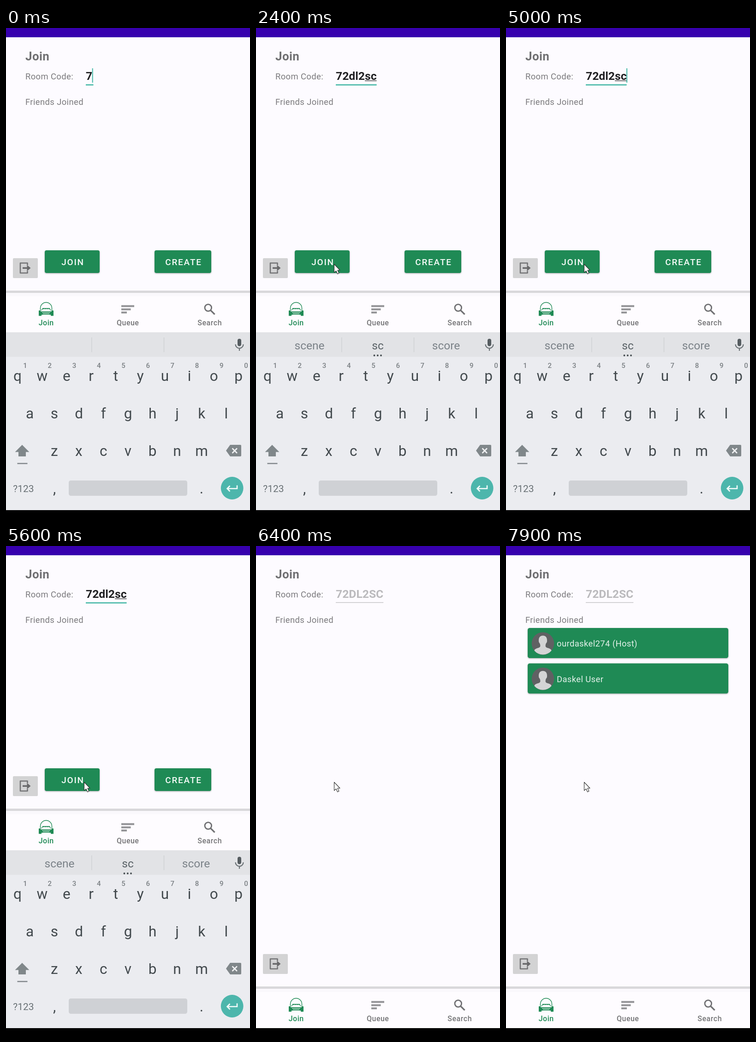
Animation, 529 px wide and 1058 px high, one loop 8000 ms. Source, as an HTML page:

```html
<!DOCTYPE html>
<html lang="en">
<head>
<meta charset="utf-8">
<title>Join a room</title>
<style>
  html, body { margin: 0; width: 100%; height: 100%; overflow: hidden; background: #fdfbff; }
  svg { display: block; width: 100vw; height: 100vh; font-family: Roboto, sans-serif; }
  .body { font-size: 18.4px; letter-spacing: .4px; fill: #7b7a7d; }
  .title { font-size: 26px; font-weight: 700; letter-spacing: .4px; fill: #707072; }
  .code { font-size: 24.7px; font-weight: 700; }
  .button { font-size: 19px; font-weight: 500; letter-spacing: 1.8px; fill: #f4fbf7; }
  .nav { font-size: 16px; font-weight: 500; letter-spacing: .5px; fill: #747476; }
  .word { font-size: 24.5px; fill: #7b8288; }
  .key { font-size: 31.5px; fill: #42494d; }
  .hint { font-size: 15px; font-weight: 500; fill: #7b8084; }
  .mid { text-anchor: middle; }
  .raised { filter: drop-shadow(0 1.5px 1.5px rgba(0, 0, 0, .32)); }
</style>
</head>
<body>
<svg viewBox="0 0 529 1058" preserveAspectRatio="none">
  <defs>
    <g id="avatar">
      <circle r="24.3" fill="#606163"/>
      <path fill="#d4d4d5" d="M0-17C-7-17-9.500-12-9-5C-8.700-1-7-2-6 2C-5 7-6 8-10 9.500C-15 11-18 12-18.500 15.500A24.300 24.300 0 0 0 18.500 15.500C18 12 15 11 10 9.500C6 8 5 7 6 2C7-2 8.700-1 9-5C9.500-12 7-17 0-17Z"/>
    </g>
  </defs>

  <rect width="529" height="1058" fill="#fdfbff"/>
  <rect width="529" height="20" fill="#3700ae"/>
  <text class="title" x="42" y="70">Join</text>
  <text class="body" x="42" y="111">Room Code:</text>
  <text class="body" x="42" y="166">Friends Joined</text>

  <text class="code" id="code" x="173" y="112"></text>
  <rect id="line" x="173"/>
  <rect id="composing" y="113.300" height="1.300" fill="#333"/>
  <rect id="caret" y="87" width="2" height="31" fill="#45b8a7"/>

  <g id="cards">
    <g class="raised" fill="#1f8a55">
      <rect x="47" y="177" width="435" height="65" rx="4.500"/>
      <rect x="47" y="253.500" width="435" height="65" rx="4.500"/>
    </g>
    <text class="body" x="110" y="217" style="fill:#e3f1ea">ourdaskel274 (Host)</text>
    <text class="body" x="110" y="293.500" style="fill:#e3f1ea">Daskel User</text>
    <g id="avatars">
      <use href="#avatar" x="80" y="210.500"/>
      <use href="#avatar" x="80" y="286.800"/>
    </g>
  </g>

  <g id="footer">
    <g id="buttons">
      <g class="raised" fill="#1f8a55">
        <rect x="84" y="480" width="119" height="49" rx="4"/>
        <rect x="322" y="480" width="123" height="49" rx="4"/>
      </g>
      <text class="button mid" x="145" y="512">JOIN</text>
      <text class="button mid" x="385" y="512">CREATE</text>
    </g>

    <rect x="15" y="497" width="54" height="43" rx="2" fill="#d3d3d4"/>
    <path d="M46.500 512V507.500H31V529H46.500V524.500" fill="none" stroke="#747476" stroke-width="2.600" stroke-linejoin="round"/>
    <path d="M36 516.500H45.500V511.500L53.500 518.200L45.500 525V520H36Z" fill="#69696b"/>

    <rect y="567" width="529" height="5" fill="#d9d8db"/>
    <rect y="572" width="529" height="7" fill="#faf8fc"/>
    <rect y="579" width="529" height="79" fill="#fefcff"/>

    <g stroke="#1f8a55" fill="none">
      <path d="M74.500 612V605A12.500 12.500 0 0 1 99.500 605V612" stroke-width="1.400"/>
      <path d="M77 610L79.500 605.500H94.500L97 610" stroke-width="1.300"/>
      <path d="M80 606H94" stroke-width="1.800" stroke-dasharray="3 1"/>
    </g>
    <path fill="#1f8a55" d="M71 610H75V612H99V610H103V621.500H97V619H77V621.500H71Z"/>
    <path d="M78 614.500H96M80 617H94" stroke="#e7f4ed" stroke-width="1"/>

    <g fill="#929295">
      <rect x="250" y="598.500" width="28" height="4"/>
      <rect x="250" y="605.500" width="20.500" height="4"/>
      <rect x="250" y="612.300" width="12" height="4"/>
    </g>
    <g fill="none" stroke="#707073" stroke-width="2.800">
      <circle cx="438.300" cy="604" r="7.300"/>
      <path d="M443.500 609.300L452.500 618.300" stroke-width="3.300"/>
    </g>
    <text class="nav mid" x="87.200" y="642" style="fill:#1f8a55">Join</text>
    <text class="nav mid" x="264.200" y="642">Queue</text>
    <text class="nav mid" x="441.700" y="642">Search</text>
  </g>

  <g id="keyboard">
    <rect y="657" width="529" height="385" fill="#ebecf0"/>
    <rect y="657" width="529" height="53" fill="#e2e3e6"/>
    <path d="M185.800 668V700M342.500 668V700" stroke="#cccfd2" stroke-width="1.300"/>
    <text class="word mid" id="left" x="116" y="694"></text>
    <text class="word mid" id="centre" x="264" y="694" style="fill:#596166"></text>
    <text class="word mid" id="right" x="412" y="694"></text>
    <g id="dots" fill="#454c50">
      <circle cx="256.500" cy="707" r="1.900"/>
      <circle cx="263.800" cy="707" r="1.900"/>
      <circle cx="271" cy="707" r="1.900"/>
    </g>

    <rect x="502" y="671" width="8" height="16" rx="4" fill="#555c60"/>
    <path d="M497.500 683A8.500 8.500 0 0 0 514.500 683M506 691.500V697" fill="none" stroke="#697074" stroke-width="2.200"/>

    <g id="keys"></g>
    <path d="M35 900L50.500 915.500H43V925H27V915.500H19.500Z" fill="#80878a"/>
    <rect x="24.500" y="939" width="22" height="2.600" fill="#868c90"/>
    <path d="M486 900H508Q510 900 510 902V923Q510 925 508 925H486L477 912.500Z" fill="#80878a"/>
    <path d="M490.500 907.500L501 918M501 907.500L490.500 918" stroke="#f1f2f4" stroke-width="2.600"/>
    <text class="mid" x="38" y="1002" font-size="21" fill="#697175">?123</text>
    <text class="key mid" x="105" y="1005">,</text>
    <text class="key mid" x="424" y="1005">.</text>
    <rect x="136" y="977" width="257" height="33" rx="4.500" fill="#cfd1d5"/>
    <circle cx="490.200" cy="993.500" r="24.400" fill="#4db6ac"/>
    <path d="M501 987.500V994.500H480M485.500 988.500L479.500 994.500L485.500 1000.500" fill="none" stroke="#f3fbfa" stroke-width="2.600"/>
  </g>

  <rect y="1041" width="529" height="17"/>
  <path id="mouse" d="M169.500 510V528L173.600 524.300L176.700 531L179.800 529.600L176.800 523H182Z" fill="#fff" stroke="#333" stroke-width="1.100" stroke-linejoin="round"/>
</svg>

<script>
const LOOP = 8000;
const JOINED = 6000, KEYBOARD_OUT = 6400, CARDS_IN = 6500, AVATARS_IN = 6900, MOUSE_IN = 2300;
const FOOTER_DROP = 384;
const TYPED = [[0, '7'], [300, '72'], [500, '72d'], [700, '72dl'], [1400, '72dl2'], [1700, '72dl2s'], [1900, '72dl2sc'], [JOINED, '72DL2SC']];
const CARET_TOGGLES = [2400, 2900, 3450, 3900, 4400, 4900, 5400];

const $ = id => document.getElementById(id);
const show = (id, on) => $(id).setAttribute('visibility', on ? 'inherit' : 'hidden');
const set = (id, attrs) => Object.entries(attrs).forEach(([name, value]) => $(id).setAttribute(name, value));

function addKey(char, x, y, type = 'key') {
  const text = document.createElementNS('http://www.w3.org/2000/svg', 'text');
  text.setAttribute('class', type + ' mid');
  text.setAttribute('x', x);
  text.setAttribute('y', y);
  text.textContent = char;
  $('keys').append(text);
}

[['qwertyuiop', 25, 762], ['asdfghjkl', 51.600, 843], ['zxcvbnm', 104.700, 924]].forEach(([row, x, y]) =>
  [...row].forEach((char, i) => addKey(char, x + i * 53.230, y)));
[...'1234567890'].forEach((digit, i) => addKey(digit, 41.500 + i * 53.230, 733.500, 'hint'));

function renderCode(t) {
  const text = TYPED.findLast(([time]) => time <= t)[1];
  const joined = t >= JOINED;
  if ($('code').textContent !== text) $('code').textContent = text;
  set('code', { fill: joined ? '#bbbabd' : '#202022' });

  const width = $('code').getComputedTextLength();
  set('line', joined
    ? { y: 121.300, height: 1.600, width, fill: '#c9c8cb' }
    : { y: 121.500, height: 2.600, width: Math.max(width, 16.500), fill: '#45b8a7' });
  set('caret', { x: 173 + width - .5 });
  show('caret', !joined && CARET_TOGGLES.filter(time => time <= t).length % 2 === 0);

  const word = text.match(/[a-z]*$/)[0];
  const start = $('code').getSubStringLength(0, text.length - word.length);
  show('composing', word);
  set('composing', { x: 173 + start, width: width - start });
  renderSuggestions(joined ? 'sc' : word);
}

function renderSuggestions(word) {
  const full = word === 'sc';
  $('centre').textContent = word;
  $('left').textContent = full ? 'scene' : '';
  $('right').textContent = full ? 'score' : '';
  show('dots', word);
}

function render(t) {
  renderCode(t);
  show('buttons', t < JOINED);
  show('keyboard', t < KEYBOARD_OUT);
  if (t >= KEYBOARD_OUT) show('dots', false);
  set('footer', { transform: `translate(0 ${t < KEYBOARD_OUT ? 0 : FOOTER_DROP})` });
  show('cards', t >= CARDS_IN);
  show('avatars', t >= AVATARS_IN);
  show('mouse', t >= MOUSE_IN);
}

const begin = performance.now();
function tick() {
  render((performance.now() - begin) % LOOP);
  requestAnimationFrame(tick);
}
tick();
</script>
</body>
</html>
```
